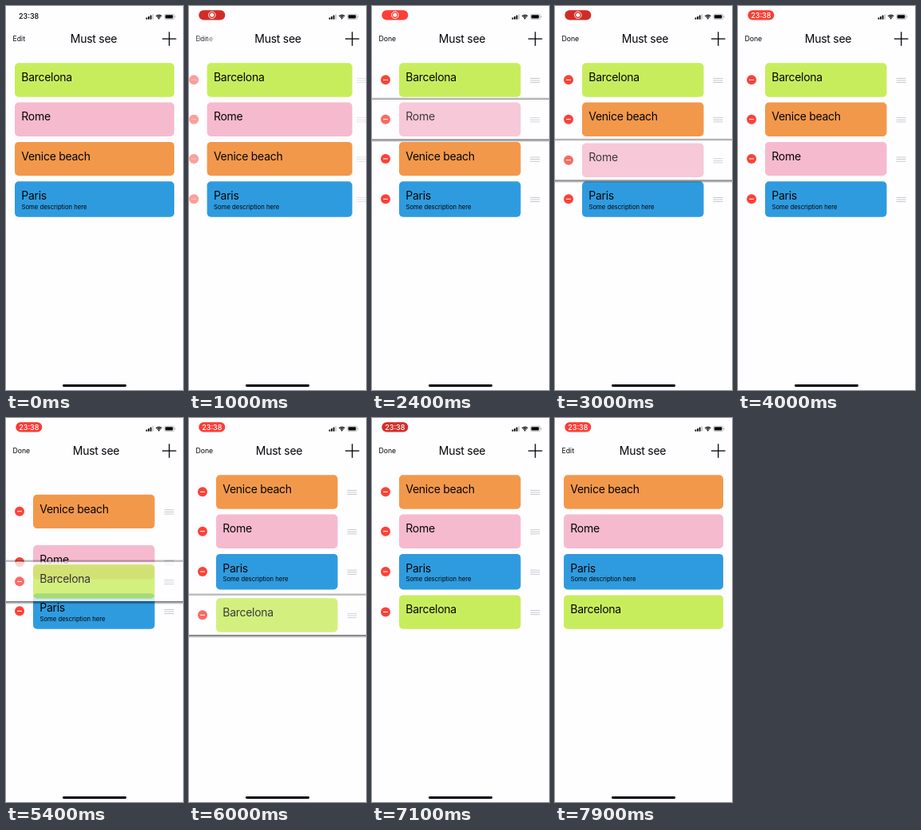
An HTML page with a canvas for the animation above (8 s loop, 222 by 480 pixels).

```html
<!DOCTYPE html>
<html lang="en">
<head>
<meta charset="utf-8">
<title>Must see</title>
<style>
  html, body { margin: 0; width: 100%; height: 100%; overflow: hidden; background: #fefdff; }
  canvas { display: block; width: 222px; height: 480px; }
</style>
</head>
<body>
<canvas id="stage"></canvas>
<script>
const W = 222, H = 480, LOOP = 8000;
const BG = '#fefdff', INK = '#050505';
const dpr = window.devicePixelRatio || 1;

function sized(canvas) {
  canvas.width = Math.round(W * dpr);
  canvas.height = Math.round(H * dpr);
  const c = canvas.getContext('2d');
  c.scale(dpr, dpr);
  return c;
}
const ctx = sized(document.getElementById('stage'));
const layer = document.createElement('canvas');
const layerCtx = sized(layer);

const lerp = (a, b, p) => a + (b - a) * p;
function ease(t, start, length) {
  const p = Math.min(1, Math.max(0, (t - start) / length));
  return p * p * (3 - 2 * p);
}

// moves: [start, length, destination]; lift: [start, drop start]
const rows = [
  { name: 'Barcelona', color: '#c8ed5c', y: 67.7, moves: [[5158, 370, 221.7], [6050, 250, 217.8]], lift: [4700, 6050] },
  { name: 'Rome', color: '#f6bace', y: 117, moves: [[2480, 370, 168], [3200, 250, 166.3], [5310, 300, 117]], lift: [1900, 3200] },
  { name: 'Venice beach', color: '#f2984b', y: 166.3, moves: [[2640, 300, 117], [5250, 300, 67.7]] },
  { name: 'Paris', note: 'Some description here', color: '#2f9bdf', y: 215.6, moves: [[5415, 300, 166.3]] }
];

const rowHeight = row => row.note ? 51.5 : 49.3;
const rowTop = (row, t) => row.moves.reduce((y, [s, d, to]) => lerp(y, to, ease(t, s, d)), row.y);
const liftOf = (row, t) => row.lift ? ease(t, row.lift[0], 200) - ease(t, row.lift[1], 250) : 0;
const editing = t => ease(t, 850, 300) - ease(t, 7400, 300);

function text(c, str, x, y, size, color = INK, weight = 400, gap = 0, align = 'left') {
  c.font = `${weight} ${size}px Inter, Roboto, sans-serif`;
  c.letterSpacing = gap + 'px';
  c.textAlign = align;
  c.fillStyle = color;
  c.fillText(str, x, y);
}

function box(c, x, y, w, h, r, color) {
  c.fillStyle = color;
  c.beginPath();
  c.roundRect(x, y, w, h, r);
  c.fill();
}

function disc(c, x, y, r, color) {
  c.fillStyle = color;
  c.beginPath();
  c.arc(x, y, r, 0, Math.PI * 2);
  c.fill();
}

function drawRow(c, row, y, edit) {
  const h = rowHeight(row), mid = y + h / 2, top = y + 3.6;
  const left = lerp(11, 34, edit), right = lerp(211, 186.5, edit * edit);
  box(c, left, top, right - left, h - 6.9, 5, row.color);
  text(c, row.name, left + 8.3, top + 22.8, 14, INK, 400, -0.28);
  if (row.note) text(c, row.note, left + 8.5, top + 34.4, 7.7);
  if (edit <= 0) return;
  c.save();
  c.globalAlpha = edit;
  const x = lerp(-5, 17, edit);
  disc(c, x, mid, 6, '#fb4238');
  c.fillStyle = '#fff';
  c.fillRect(x - 3, mid - 0.5, 6, 1);
  c.fillStyle = '#c3c3c6';
  for (let i = -1; i <= 1; i++) {
    c.fillRect(lerp(222, 198.5, edit), mid + 0.2 + i * 2.6, 12, 0.9);
  }
  c.restore();
}

function shade(y, h, from, to) {
  const g = ctx.createLinearGradient(0, y, 0, y + h);
  g.addColorStop(0, `rgba(0,0,0,${from})`);
  g.addColorStop(1, `rgba(0,0,0,${to})`);
  ctx.fillStyle = g;
  ctx.fillRect(0, y, W, h);
}

function drawLifted(row, t, edit, lift) {
  const y = rowTop(row, t), h = rowHeight(row);
  layerCtx.clearRect(0, 0, W, H);
  layerCtx.fillStyle = BG;
  layerCtx.fillRect(0, y, W, h);
  drawRow(layerCtx, row, y, edit);
  shade(y - 3, 3, 0, 0.45 * lift);
  shade(y + h, 4, 0.6 * lift, 0);
  ctx.globalAlpha = 1 - 0.22 * lift;
  ctx.drawImage(layer, 0, 0, W, H);
  ctx.globalAlpha = 1;
}

function drawClock(t) {
  if (t < 500) {
    text(ctx, '23:38', 16, 16.4, 9, INK, 500);
    return;
  }
  const dim = Math.max(0, -Math.cos(t * Math.PI / 1000)) ** 2;
  box(ctx, 12.3, 5.2, 33, 12.2, 6, `rgb(${lerp(251, 208, dim)},${lerp(62, 44, dim)},${lerp(54, 38, dim)})`);
  const label = ease(t, 3000, 200);
  ctx.globalAlpha = 1 - label;
  ctx.strokeStyle = '#fff';
  ctx.lineWidth = 0.9;
  ctx.beginPath();
  ctx.arc(28.8, 11.3, 4.3, 0, Math.PI * 2);
  ctx.stroke();
  disc(ctx, 28.8, 11.3, 2.5, '#fff');
  ctx.globalAlpha = label;
  text(ctx, '23:38', 28.8, 14.6, 9, '#fff', 500, 0, 'center');
  ctx.globalAlpha = 1;
}

function drawStatus() {
  for (let i = 0; i < 4; i++) {
    const h = 2.3 + i * 1.4;
    box(ctx, 175.5 + i * 2.6, 16.7 - h, 1.8, h, 0.4, i < 3 ? INK : '#c9c9cb');
  }
  ctx.strokeStyle = INK;
  ctx.lineWidth = 1.2;
  for (const r of [2.9, 4.9]) {
    ctx.beginPath();
    ctx.arc(191.7, 16.2, r, -Math.PI * 0.76, -Math.PI * 0.24);
    ctx.stroke();
  }
  disc(ctx, 191.7, 15.6, 1, INK);
  ctx.strokeStyle = '#98989b';
  ctx.lineWidth = 0.6;
  ctx.beginPath();
  ctx.roundRect(198.8, 10.2, 12.2, 6.4, 1.8);
  ctx.stroke();
  box(ctx, 199.8, 11.2, 9.6, 4.4, 1, INK);
  box(ctx, 211.6, 12.3, 0.8, 2.2, 0.4, '#98989b');
}

function drawBar(edit) {
  ctx.globalAlpha = 1 - edit;
  text(ctx, 'Edit', 8.5, 44.2, 8.7);
  ctx.globalAlpha = edit;
  text(ctx, 'Done', 8.5, 44.2, 8.7);
  ctx.globalAlpha = 1;
  text(ctx, 'Must see', lerp(110, 113, edit), 46.2, 14, INK, 400, -0.28, 'center');
  ctx.fillStyle = INK;
  ctx.fillRect(196, 40.4, 17.5, 1.3);
  ctx.fillRect(204.1, 32.3, 1.3, 17.5);
}

function draw(t) {
  const edit = editing(t);
  ctx.fillStyle = BG;
  ctx.fillRect(0, 0, W, H);
  for (const row of rows) {
    if (liftOf(row, t) <= 0) drawRow(ctx, row, rowTop(row, t), edit);
  }
  for (const row of rows) {
    const lift = liftOf(row, t);
    if (lift > 0) drawLifted(row, t, edit, lift);
  }
  drawBar(edit);
  drawClock(t);
  drawStatus();
  box(ctx, 71, 473, 80, 2.9, 1.4, '#000');
}

const began = performance.now();
function tick() {
  draw((performance.now() - began) % LOOP);
  requestAnimationFrame(tick);
}
tick();
</script>
</body>
</html>
```
